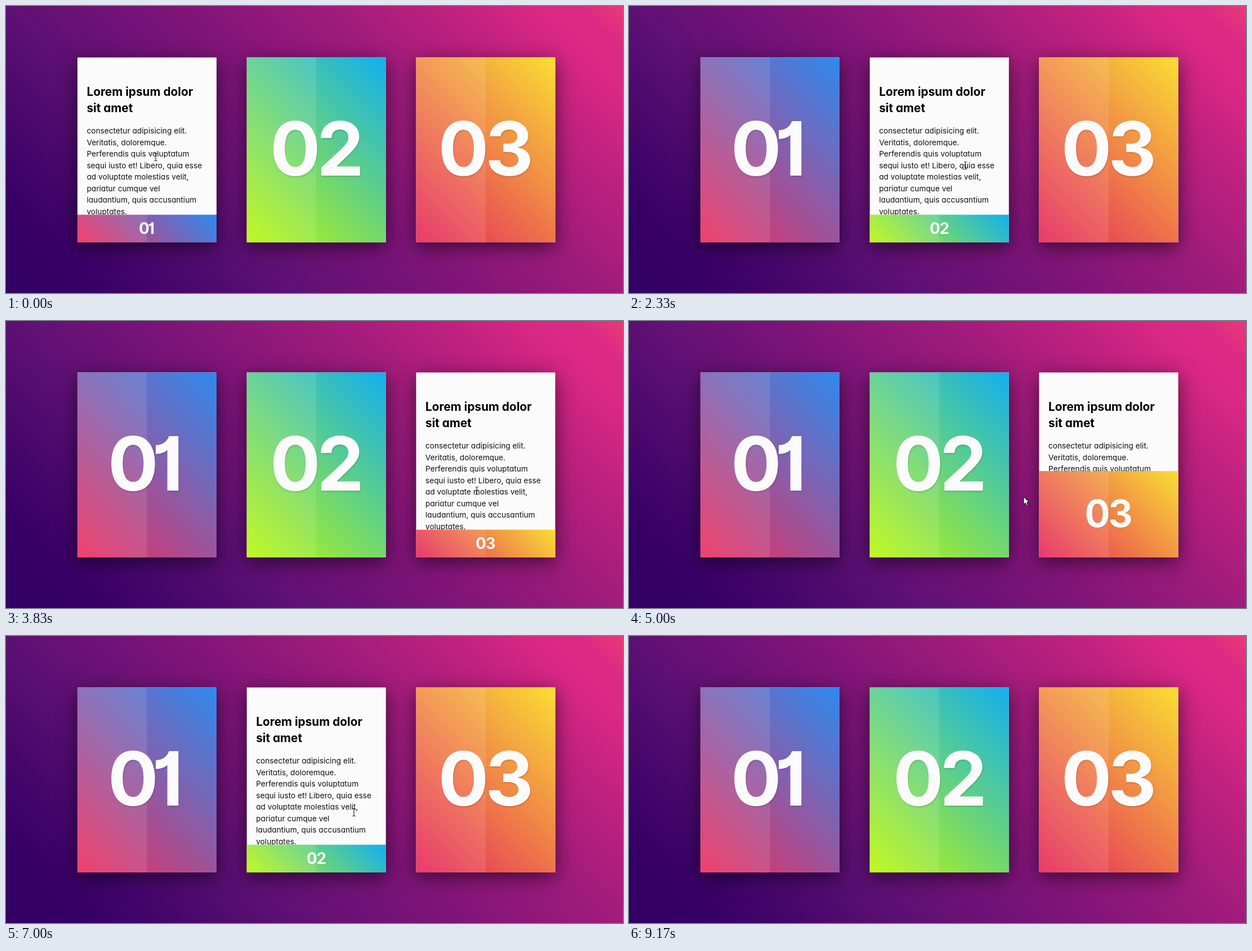
Recreate the animation shown at these times as an HTML page. Size 1096 px wide and 511 px high, loop 9340 ms.

```html
<!DOCTYPE html>
<html lang="en">
<head>
<meta charset="utf-8">
<title>Three sliding cards</title>
<style>
  html, body { margin: 0; width: 100%; height: 100%; overflow: hidden; background: #320064; }
  svg { display: block; width: 100%; height: 100%; }
  text { font-family: Inter, "Open Sans", sans-serif; font-feature-settings: "cv11"; }
  .title { font-size: 20.8px; font-weight: 700; fill: #000; }
  .body { font-size: 13.7px; font-weight: 370; fill: #111; }
  .number { font-size: 133px; font-weight: 740; fill: #fbfbfb; text-anchor: middle; font-feature-settings: "cv01"; }
</style>
</head>
<body>
<svg id="stage" viewBox="0 0 1096 511" preserveAspectRatio="none" xmlns="http://www.w3.org/2000/svg">
  <defs>
    <linearGradient id="sky" gradientUnits="userSpaceOnUse" x1="146.25" y1="657.25" x2="949.75" y2="-146.25">
      <stop offset="0" stop-color="#320064"/>
      <stop offset=".1" stop-color="#360066"/>
      <stop offset=".32" stop-color="#5e1074"/>
      <stop offset=".5" stop-color="#7f1478"/>
      <stop offset=".66" stop-color="#9d1b7b"/>
      <stop offset=".8" stop-color="#bf217e"/>
      <stop offset=".9" stop-color="#da2884"/>
      <stop offset=".95" stop-color="#dc2a84"/>
      <stop offset="1" stop-color="#ea3a78"/>
    </linearGradient>
    <filter id="cardShadow" x="-30%" y="-30%" width="160%" height="160%" color-interpolation-filters="sRGB">
      <feDropShadow dx="0" dy="8" stdDeviation="17" flood-color="#000" flood-opacity=".58"/>
    </filter>
    <filter id="numberShadow" x="-20%" y="-20%" width="140%" height="140%" color-interpolation-filters="sRGB">
      <feDropShadow dx="1" dy="2" stdDeviation="1.3" flood-color="#000" flood-opacity=".14"/>
    </filter>
  </defs>
  <rect width="1096" height="511" fill="url(#sky)"/>
  <g id="cards"></g>
  <path id="arrow" d="M0 0V13.6L3.1 10.8L5.2 15.6L7.6 14.6L5.5 9.9H9.8Z" fill="#fff" stroke="#000" stroke-width="1"/>
  <path id="beam" d="M-2.5 -6.5H-.8L0 -5.8L.8 -6.5H2.5M0 -5.8V5.8M-2.5 6.5H-.8L0 5.8L.8 6.5H2.5" fill="none" stroke="#000" stroke-width="1"/>
</svg>
<script>
const LOOP = 9340, TICK = 1000 / 6, TRANSITION = 0.5;
const TOP = 91.6, W = 247.1, H = 329.4, BOTTOM = TOP + H, OPEN = 0.15;

const bodyLines = [
  "consectetur adipisicing elit.", "Veritatis, doloremque.",
  "Perferendis quis voluptatum", "sequi iusto et! Libero, quia esse",
  "ad voluptate molestias velit,", "pariatur cumque vel",
  "laudantium, quis accusantium", "voluptates."
];

// hovers: [enter, leave] in seconds; digits: centre of each digit from the card's middle
const cards = [
  { x: 126.9, from: "#ef2b5b", to: "#2d8af0", label: "01", digits: "-24.5 36.5", hovers: [[-1, 0.62], [7.624, 8.6]] },
  { x: 427.7, from: "#bcf70a", to: "#12afef", label: "02", digits: "-37.5 43", hovers: [[1.034, 2.6], [5.25, 7.4]] },
  { x: 728.5, from: "#e5245c", to: "#fade34", label: "03", digits: "-39.5 42", hovers: [[3.117, 4.883]] }
];

// pointer path: seconds, x, y
const route = [
  [0, 266, 269], [0.35, 296, 270], [0.62, 374, 271], [1.034, 428, 266], [1.167, 473, 263],
  [1.6, 560, 266], [2.2, 600, 285], [2.6, 675, 298], [3.117, 730, 303], [3.167, 767, 304],
  [3.5, 838, 300], [4.3, 830, 310], [4.883, 728, 313], [5, 701, 313], [5.25, 675, 315],
  [5.7, 590, 320], [6.4, 600, 318], [7, 618, 314], [7.4, 428, 290], [7.624, 374, 276],
  [8, 323, 267], [8.35, 296, 200], [8.6, 280, 92], [9, 262, -25]
];

const byId = id => document.getElementById(id);
const set = (el, attrs) => { for (const k in attrs) el.setAttribute(k, attrs[k]); };
const mix = (a, b, k) => a + (b - a) * k;
const clamp = v => Math.min(1, Math.max(0, v));

// the CSS "ease" curve, cubic-bezier(.25, .1, .25, 1)
function ease(v) {
  const x = clamp(v);
  if (x === 0 || x === 1) return x;
  const curve = (a, b, s) => 3 * a * s * (1 - s) ** 2 + 3 * b * s * s * (1 - s) + s ** 3;
  let lo = 0, hi = 1;
  for (let i = 0; i < 24; i++) {
    const mid = (lo + hi) / 2;
    if (curve(0.25, 0.25, mid) < x) lo = mid; else hi = mid;
  }
  return curve(0.1, 1, lo);
}

function cardMarkup(c, i) {
  const left = c.x + 16.5;
  const lines = bodyLines.map((s, n) => `<text class="body" x="${left}" y="${227 + n * 20.57}">${s}</text>`).join("");
  return `
    <linearGradient id="fill${i}" gradientUnits="userSpaceOnUse">
      <stop offset="0" stop-color="${c.from}"/><stop offset="1" stop-color="${c.to}"/>
    </linearGradient>
    <rect x="${c.x}" y="${TOP}" width="${W}" height="${H}" fill="#fbfbfb" filter="url(#cardShadow)"/>
    <text class="title" x="${left}" y="160.4">Lorem ipsum dolor</text>
    <text class="title" x="${left}" y="189.2">sit amet</text>
    ${lines}
    <rect id="panel${i}" x="${c.x}" width="${W}" fill="url(#fill${i})"/>
    <rect id="shine${i}" x="${c.x}" width="${W / 2}" fill="#fff" fill-opacity=".1"/>
    <g id="number${i}"><text class="number" x="${c.digits}" y="45.5" filter="url(#numberShadow)">${c.label}</text></g>`;
}

byId("cards").innerHTML = cards.map(cardMarkup).join("");
cards.forEach((c, i) => {
  for (const part of ["fill", "panel", "shine", "number"]) c[part] = byId(part + i);
});

function drawCard(c, t) {
  let opened = 0;
  for (const [enter, leave] of c.hovers)
    opened += ease((t - enter) / TRANSITION) - ease((t - leave) / TRANSITION);
  const h = H * mix(1, OPEN, opened);
  const midX = c.x + W / 2, midY = BOTTOM - h / 2, reach = (W + h) / 4;
  c.edge = BOTTOM - h;
  set(c.panel, { y: c.edge, height: h });
  set(c.shine, { y: c.edge, height: h });
  set(c.fill, { x1: midX - reach, y1: midY + reach, x2: midX + reach, y2: midY - reach });
  set(c.number, { transform: `translate(${midX} ${midY}) scale(${mix(1, 0.21, opened)})` });
}

function pointerAt(t) {
  const next = route.findIndex(p => p[0] > t);
  if (next < 0) return route[route.length - 1].slice(1);
  const a = route[next - 1], b = route[next], k = (t - a[0]) / (b[0] - a[0]);
  return [mix(a[1], b[1], k), mix(a[2], b[2], k)];
}

function drawPointer(t) {
  const [x, y] = pointerAt(t);
  const overText = cards.some(c => x > c.x + 16 && x < c.x + W - 16 && y > 140 && y < c.edge);
  const transform = `translate(${x} ${y})`;
  set(byId("arrow"), { transform, visibility: overText ? "hidden" : "visible" });
  set(byId("beam"), { transform, visibility: overText ? "visible" : "hidden" });
}

function draw(ms) {
  // the picture advances six times a second
  const t = Math.min(55, Math.floor(ms / TICK + 0.001)) * TICK / 1000;
  cards.forEach(c => drawCard(c, t));
  drawPointer(t);
}

let start;
function frame(now) {
  start ??= now;
  draw((now - start) % LOOP);
  requestAnimationFrame(frame);
}
draw(0);
requestAnimationFrame(frame);
</script>
</body>
</html>
```
